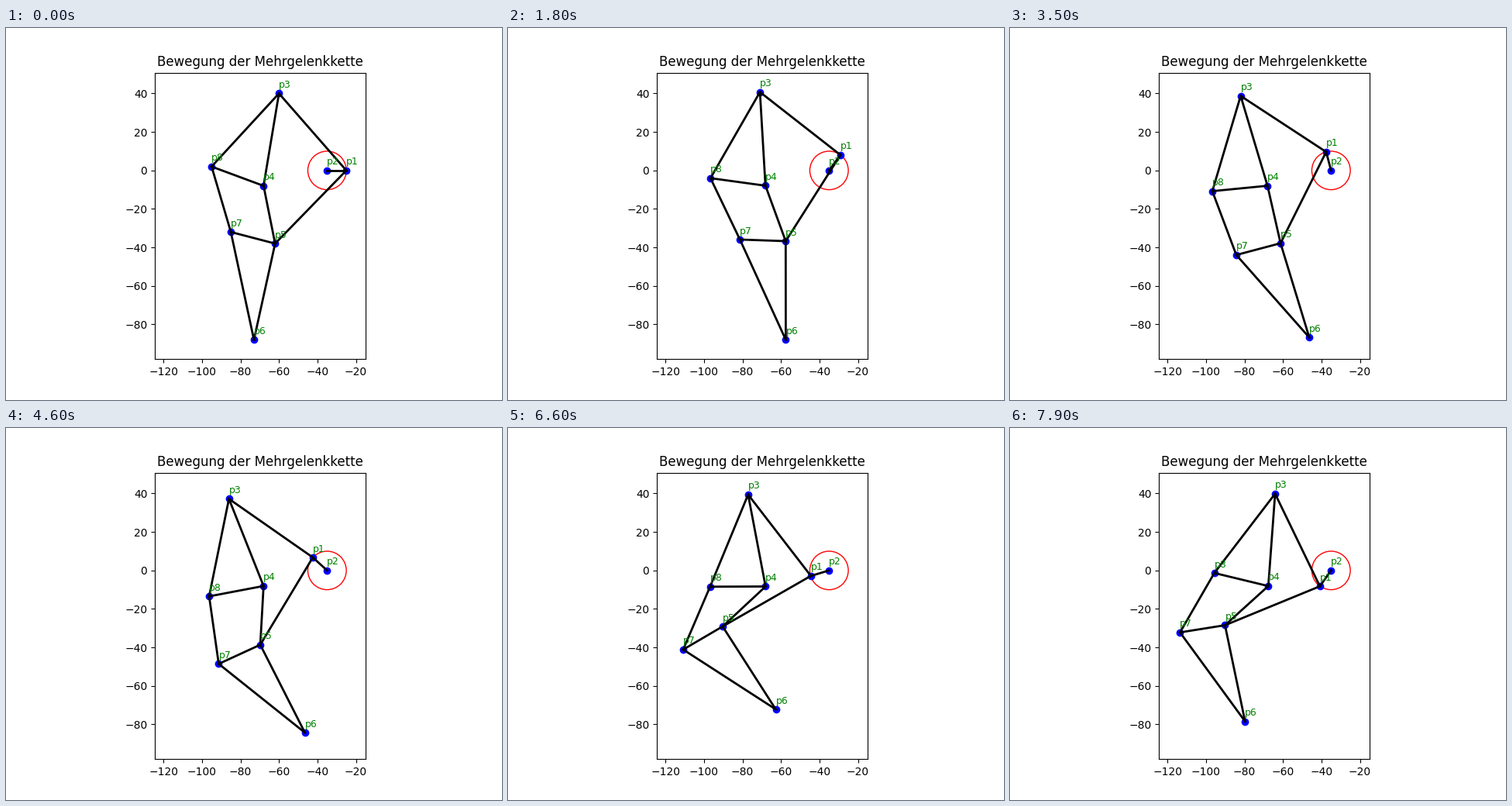
These frames come from a looping animation (640 px wide and 480 px high, 8 s). A matplotlib script:

```python
import numpy as np
import matplotlib.pyplot as plt
from matplotlib.animation import FuncAnimation
from matplotlib.patches import Circle

FRAMES = 80
STEPS = 120   # steps per crank turn
SWEEPS = 30   # relaxation sweeps per step
RADIUS = 10
MARGIN = 10

START = {
    "p1": (-25, 0), "p2": (-35, 0), "p3": (-60, 40), "p4": (-68, -8),
    "p5": (-62, -38), "p6": (-73, -88), "p7": (-85, -32), "p8": (-95, 2),
}
START = {name: np.array(xy, float) for name, xy in START.items()}

LINKS = [("p1", "p2"), ("p1", "p3"), ("p1", "p5"), ("p3", "p4"), ("p4", "p5"),
         ("p3", "p8"), ("p4", "p8"), ("p7", "p8"), ("p5", "p7"), ("p5", "p6"),
         ("p6", "p7")]
LENGTHS = [np.linalg.norm(START[b] - START[a]) for a, b in LINKS]


def relax(pose, pins):
    """Pull the bars back to length, holding the pinned joints in place."""
    for _ in range(SWEEPS):
        pose.update(pins)
        for (a, b), length in zip(LINKS, LENGTHS):
            d = pose[b] - pose[a]
            dist = np.hypot(*d)
            shift = d * (dist - length) / (2 * dist)
            pose[a] = pose[a] + shift
            pose[b] = pose[b] - shift


def simulate():
    pose, poses = dict(START), []
    for angle in np.arange(STEPS) * 2 * np.pi / STEPS:
        crank = START["p2"] + RADIUS * np.array([np.cos(angle), np.sin(angle)])
        relax(pose, {"p1": crank, "p2": START["p2"], "p4": START["p4"]})
        poses.append(dict(pose))
    return poses


poses = simulate()
track = np.array([[pose[name] for name in START] for pose in poses])
low = track.min(axis=(0, 1)) - MARGIN
high = track.max(axis=(0, 1)) + MARGIN

fig, ax = plt.subplots(figsize=(6.4, 4.8), dpi=100)
ax.set_aspect("equal")
ax.set_xlim(low[0], high[0])
ax.set_ylim(low[1], high[1])
ax.set_title("Bewegung der Mehrgelenkkette")

ax.add_patch(Circle(START["p2"], RADIUS, fill=False, color="red"))
dots, = ax.plot([], [], "bo")
bars = [ax.plot([], [], "k-", lw=2)[0] for _ in LINKS]
labels = {name: ax.text(0, 0, name, fontsize=9, color="green") for name in START}


def update(frame):
    pose = poses[frame]
    dots.set_data(*track[frame].T)
    for bar, (a, b) in zip(bars, LINKS):
        bar.set_data(*zip(pose[a], pose[b]))
    for name, label in labels.items():
        label.set_position(pose[name] + (0, 3))
    return [dots, *bars, *labels.values()]


anim = FuncAnimation(fig, update, frames=FRAMES, interval=100, repeat=True,
                     repeat_delay=0)
plt.show()
```
